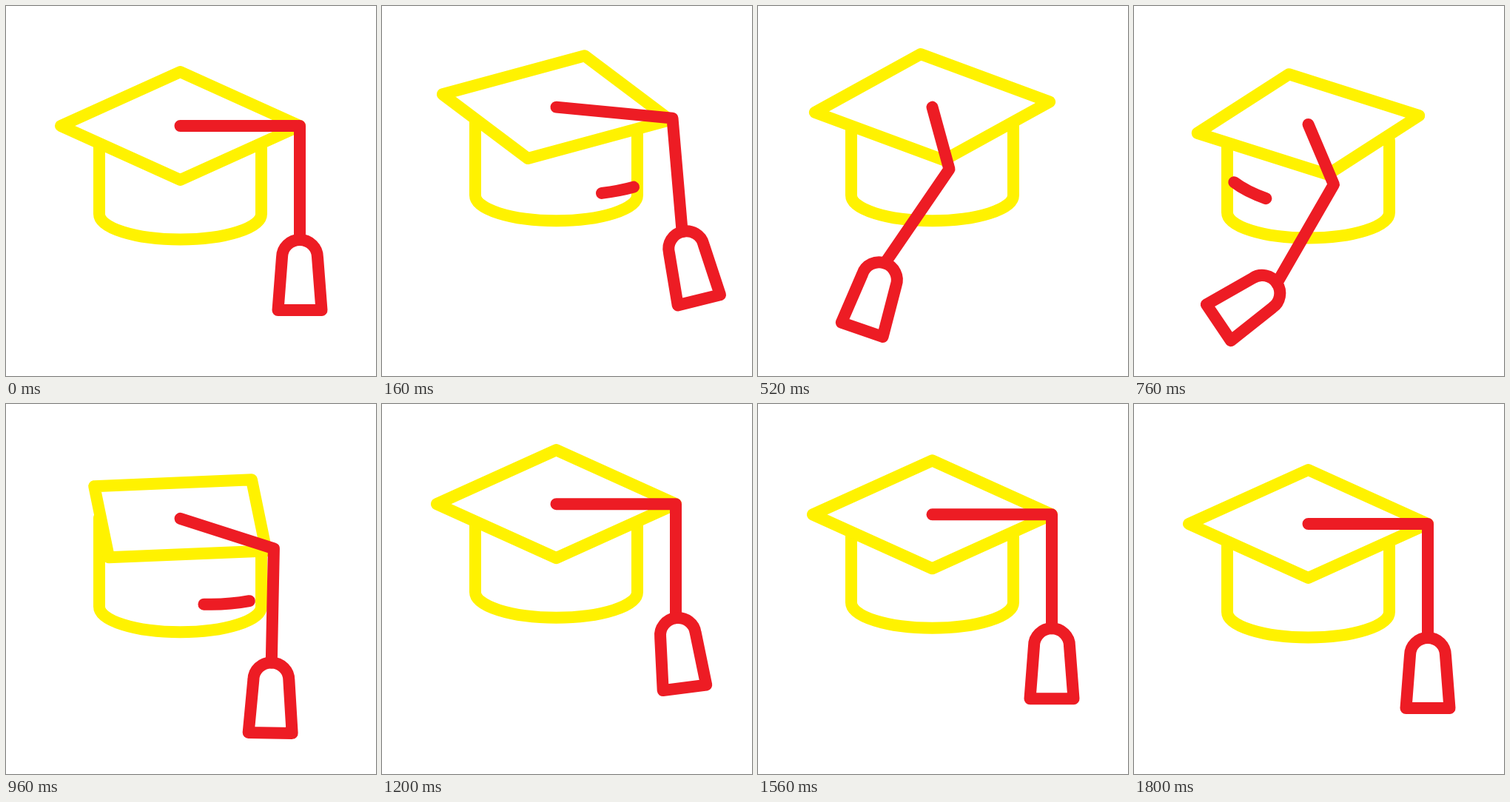
These frames come from a looping animation (500x500 px, 2000 ms). An HTML page:

```html
<!DOCTYPE html>
<html lang="en">
<head>
<meta charset="utf-8">
<title>Graduation cap</title>
<style>
  html, body { margin: 0; height: 100%; overflow: hidden; background: #fff; }
  svg { display: block; width: 100%; height: 100%; }
  path { fill: none; stroke-width: 16; stroke-linecap: round; stroke-linejoin: round; }
  .cap path { stroke: #fff200; }
  .tassel path { stroke: #ed1c24; }
  #board { fill: #fff; }
</style>
</head>
<body>
<svg viewBox="0 0 500 500">
  <g id="hat">
    <g class="cap">
      <path d="M126 161V281A109.5 34.5 0 0 0 345 281V184"/>
      <path id="board"/>
    </g>
    <g class="tassel">
      <path id="sweepLeft" pathLength="1" d="M340 270C290 284 190 290 124 261"/>
      <path id="sweepRight" pathLength="1" d="M126 232C160 268 260 290 340 271"/>
      <path id="cord"/>
      <path id="bob" d="M-29.5 95L-24 23.5A24 23.5 0 0 1 24 23.5L29.5 95Z"/>
    </g>
  </g>
</svg>
<script>
const LOOP = 2000, STEP = 40, LAST = 1800;
const HUB = { x: 235.5, y: 162 }, RX = 161.5, RY = 73, CORD = 154;
const RAD = Math.PI / 180;
const el = id => document.getElementById(id);

const ramp = (t, from, to) => Math.min(1, Math.max(0, (t - from) / (to - from)));
const smooth = u => (1 - Math.cos(Math.PI * u)) / 2;
const ease = (t, from, to) => smooth(ramp(t, from, to));
// Rises from 0 to 1 and falls back within the span.
const bump = (t, from, to) => Math.sin(Math.PI * ramp(t, from, to)) ** 2;

// Two hops, the second one lower.
const lift = t => 41.5 * (ease(t, 0, 280) - ease(t, 280, 840))
  + 28.8 * (ease(t, 800, 1280) - ease(t, 1280, 1800));

// Swings of the tassel in degrees, positive to the right.
const cordSwing = t => 6 * bump(t, 0, 250) - 42 * bump(t, 250, 1000) + 7 * bump(t, 960, 1200);
const bobSwing = t => 25 * bump(t, 0, 600) - 64 * bump(t, 400, 985) + 18 * bump(t, 950, 1270);

function sweep(path, tail, head) {
  const length = head - tail;
  path.style.display = length > 0 ? "" : "none";
  path.setAttribute("stroke-dasharray", `${length} 2`);
  path.setAttribute("stroke-dashoffset", -tail);
}

function draw(t) {
  el("hat").setAttribute("transform", `translate(0 ${-lift(t)})`);

  // A quarter turn and back; the board shrinks a little midway.
  const out = ramp(t, 0, 620), back = ramp(t, 560, 1200);
  const turn = Math.PI / 2 * (smooth(out) - smooth(back ** 1.32));
  const size = 1 - .027 * Math.sin(Math.PI * out) - .07 * Math.sin(Math.PI * back);
  const corners = [0, 1, 2, 3].map(i => {
    const a = turn + i * Math.PI / 2;
    return `${HUB.x + RX * size * Math.cos(a)} ${HUB.y + RY * size * Math.sin(a)}`;
  });
  el("board").setAttribute("d", `M${corners.join("L")}Z`);

  // The cord trails the board slightly and hangs past its edge at the front.
  const angle = .97 * turn, s = Math.sin(angle), swing = cordSwing(t) * RAD;
  const tipX = HUB.x + RX * Math.cos(angle), tipY = HUB.y + (64 + 22 * s ** 6) * s;
  const endX = tipX + CORD * Math.sin(swing), endY = tipY + CORD * Math.cos(swing);
  el("cord").setAttribute("d", `M${HUB.x} ${HUB.y}L${tipX} ${tipY}L${endX} ${endY}`);
  el("bob").setAttribute("transform", `translate(${endX} ${endY}) rotate(${-bobSwing(t)})`);

  sweep(el("sweepLeft"), ramp(t, 265, 440), ramp(t, 120, 320));
  sweep(el("sweepRight"), ramp(t, 742, 1065), ramp(t, 680, 975));
}

const start = performance.now();
function tick() {
  const t = (performance.now() - start) % LOOP;
  draw(Math.min(LAST, Math.floor(t / STEP) * STEP));
  requestAnimationFrame(tick);
}
tick();
</script>
</body>
</html>
```
